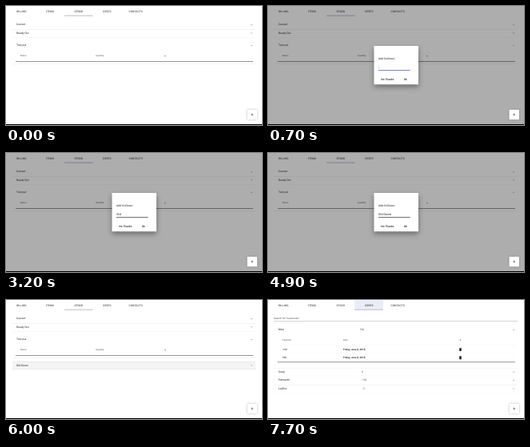
An HTML page for the animation above (8000 ms loop, 320 by 149 pixels).

```html
<!DOCTYPE html>
<html lang="en">
<head>
<meta charset="utf-8">
<title>Stock and debts</title>
<style>
  html, body { margin: 0; width: 100%; height: 100%; overflow: hidden; background: #fff; }
  svg { display: block; width: 100%; height: 100%; }
  text { font-family: Roboto, "Open Sans", sans-serif; text-rendering: geometricPrecision; }
  .panel { fill: #fff; filter: drop-shadow(0 .5px .3px rgba(0,0,0,.3)); }
  .flat { filter: drop-shadow(0 .3px .2px rgba(0,0,0,.13)); }
  .card { fill: #fff; filter: drop-shadow(0 1px .7px rgba(0,0,0,.42)); }
  .dialog { fill: #fff; filter: drop-shadow(0 3px 3px rgba(0,0,0,.38)); }
  .fab { fill: #fff; filter: drop-shadow(0 .9px .9px rgba(0,0,0,.32)); }
  .line { fill: none; }
</style>
</head>
<body>
<svg id="stage" viewBox="0 0 320 149" preserveAspectRatio="none"></svg>
<script>
const LOOP = 8000, STEP = 100;
const INDIGO = '#3f51b5', LAVENDER = '#a9a9c4';
const TABS = ['BILLING', 'ITEMS', 'STOCK', 'DEBTS', 'CONTACTS'];
// [time, text in the field]
const TYPING = [[0, ''], [2800, 'O'], [3000, 'Ol'], [3200, 'Old'], [3600, 'Old D'], [3800, 'Old Do'],
  [4300, 'Old D'], [4400, 'Old Do'], [4600, 'Old Dow'], [4700, 'Old Down']];

const stage = document.getElementById('stage');
const clamp = v => Math.max(0, Math.min(1, v));
const ramp = (t, from, to) => clamp((t - from) / (to - from));
const ease = p => p * p * (3 - 2 * p);
const mix = (a, b, p) => a + (b - a) * p;

const text = (x, y, s, size = 3.5, color = '#222', extra = '') =>
  `<text x="${x}" y="${y + size * .36}" font-size="${size}" fill="${color}" xml:space="preserve" ${extra}>${s}</text>`;
const rect = (x, y, w, h, attrs) => `<rect x="${x}" y="${y}" width="${w}" height="${h}" ${attrs}/>`;
const group = (s, attrs) => `<g ${attrs}>${s}</g>`;
const path = (d, color, width) =>
  `<path class="line" d="${d}" stroke="${color}" stroke-width="${width}"/>`;
const plus = (x, y, r, color, width) =>
  path(`M${x - r} ${y}h${2 * r}M${x} ${y - r}v${2 * r}`, color, width);
const chevron = (y, up) => path(`M306 ${y + (up ? .5 : -.5)}l1 ${up ? -1 : 1}l1 ${up ? 1 : -1}`, '#666', .5);
const trash = (x, y) =>
  rect(x - 1.2, y - 1.2, 2.4, 3.2, 'rx=".4" fill="#111"') + rect(x - 1.5, y - 2, 3, .6, 'fill="#111"');

function panel(y, h, label, { open = 0, value = '', valueX = 117, fill = '#fff', style = 'panel' } = {}) {
  const mid = y + mix(4.2, 5, open);
  return rect(8, y, 304, h, `class="${style}" fill="${fill}" style="fill:${fill}"`) +
    text(13, mid, label, 3.45) + text(valueX, mid, value, 3.2, '#555') + chevron(mid + .4, open > .5);
}

const stockTable = (y, open) => open <= 0 ? '' : group(
  rect(12, y, 297, 13 * open, 'rx=".4" class="card"') +
  text(18, y + 6.4 * open, 'Name', 2.8, '#555') +
  text(112, y + 6.4 * open, 'Quantity', 2.8, '#555') +
  plus(199, y + 6.6 * open, 1, '#777', .45), `opacity="${open}"`);

function tabs(t) {
  const slide = ease(ramp(t, 7100, 7500));
  const hover = t >= 7100 ? mix(.22, .11, ramp(t, 7300, 7700)) : 0;
  return rect(108.3, 0.5, 35.7, 11.5, `fill="${INDIGO}" opacity="${hover}"`) +
    TABS.map((name, i) => {
      const active = i === (t < 7200 ? 2 : 3);
      return text(19.4 + i * 35.7, 6.8, name, 3.4, active ? '#444' : '#555', 'text-anchor="middle" font-weight="500"');
    }).join('') +
    rect(mix(73, 108.3, slide), 11.7, 35.5, .8, `fill="${LAVENDER}"`);
}

function stock(t) {
  const p = ease(ramp(t, 6200, 6500)), closed = 1 - p;
  const testY = mix(44, 39.4, p), oldY = mix(77.2, 53, p);
  const added = t < 5100 ? '' :
    panel(oldY, mix(9.6, 28.5, p), 'Old Down', { open: p, fill: '#f4f4f4' }) + stockTable(oldY + 12, p);
  return panel(19, 10, 'Current') + panel(29.2, 9.9, 'Ready Out') +
    panel(testY, mix(28.2, 9.6, p), 'Test put', { open: closed }) + stockTable(testY + 12, closed) + added;
}

function debts() {
  const payments = [['-100', 61.6], ['500', 72]];
  const customers = [['Suraj', '0', 117], ['Hemanth', '-100', 117], ['Lalitha', '-5', 118]];
  return text(7, 22.7, 'Search for Customers', 3.3, '#555') + rect(7, 26, 305, .5, 'fill="#aaa"') +
    panel(32, 48, 'Nitin', { open: 1, value: '500', valueX: 115 }) +
    rect(12, 44, 297, 33.2, 'rx=".4" class="card"') +
    text(18, 49.8, 'Payment', 2.8, '#555') + text(94, 49.8, 'Date', 2.8, '#555') + plus(240.5, 50, 1, '#777', .45) +
    rect(12, 56, 297, .3, 'fill="#eee"') + rect(12, 66.8, 297, .3, 'fill="#eee"') +
    payments.map(([sum, y]) =>
      text(18, y, sum, 3.1) + text(94, y, 'Friday, June 8, 2018', 3.1, '#111', 'font-weight="500"') +
      trash(240.5, y + .3)).join('') +
    customers.map(([name, value, valueX], i) =>
      panel(85.5 + i * 10.5, 10.4, name, { value, valueX, style: 'flat' })).join('');
}

function dialog(t) {
  if (t < 500 || t >= 5100) return '';
  const shown = ramp(t, 400, 600);
  const typed = TYPING.filter(([at]) => at <= t).pop();
  const blinkFrom = typed[0] || 600;
  const caretOn = Math.floor((t - blinkFrom) / 500) % 2 === 0;
  const caret = caretOn ? '<tspan font-weight="300" dx="-.2">|</tspan>' : '';
  const body = rect(132.5, 50, 55.5, 48.3, 'rx=".6" class="dialog"') +
    text(138, 65.5, 'Add GoDown') +
    text(138, 77.1, typed[1] + caret, 3.7) +
    rect(138, 80.1, 39.7, .7, `fill="${t < 1400 ? INDIGO : '#333'}"`) +
    text(141.3, 91.8, 'No Thanks', 3.4, '#222', 'font-weight="500"') +
    text(169.7, 91.8, 'Ok', 3.4, '#222', 'font-weight="500"');
  const scale = mix(.7, 1, shown);
  return rect(0, 0, 320, 148, `fill="#000" opacity="${.32 * ramp(t, 400, 700)}"`) +
    group(body, `opacity="${shown}" transform="translate(160.2 74) scale(${scale}) translate(-160.2 -74)"`);
}

const fab = () => rect(301.5, 129.7, 12.5, 12.5, 'rx=".7" class="fab"') + plus(307.7, 136, 1.4, '#333', .55);

function render(t) {
  stage.innerHTML = rect(0, 0, 320, 149, 'fill="#fff"') + tabs(t) +
    (t < 7200 ? stock(t) : debts()) + dialog(t) + fab() + rect(0, 148, 320, 1, 'fill="#000"');
}

const start = performance.now();
let last = -1;
function tick() {
  const elapsed = (performance.now() - start) % LOOP;
  const t = Math.floor(elapsed / STEP) * STEP;
  if (t !== last) render(last = t);
  requestAnimationFrame(tick);
}
tick();
</script>
</body>
</html>
```
